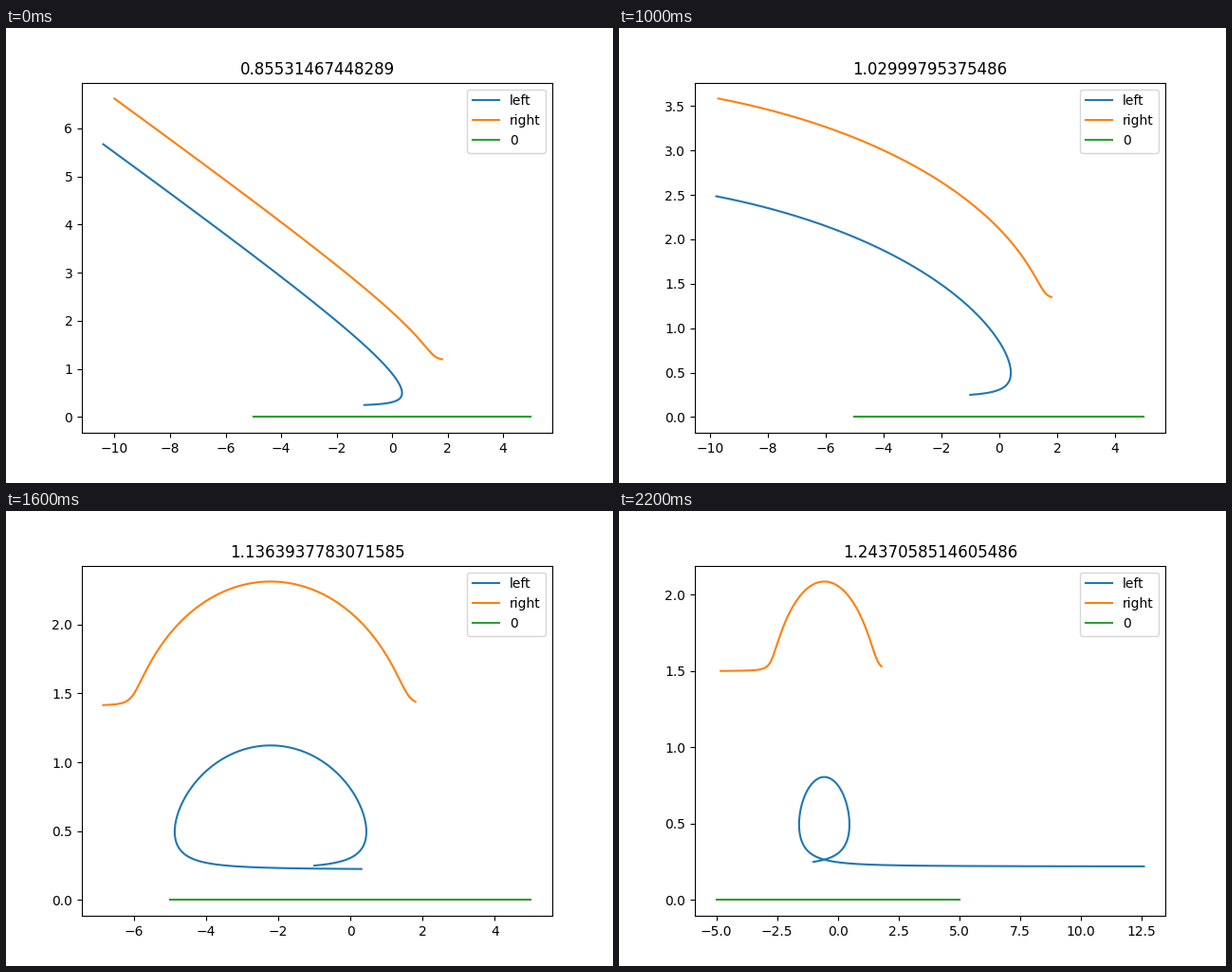
A matplotlib script for the animation above (2400 ms loop, 640x480 px).

```python
import numpy as np
import matplotlib.pyplot as plt
from matplotlib.animation import FuncAnimation

# Two opposite point vortices above a wall at y = 0, with mirror images.
X1, Y1, X2 = -1, 0.25, 1.8
HEIGHTS = np.arange(1.2, 1.55, 0.03)
T_END, STEPS = 15, 1500


def velocity(state):
    x1, y1, x2, y2 = state
    dx, d, s = x2 - x1, y2 - y1, y1 + y2
    r2, q2 = dx**2 + d**2, dx**2 + s**2
    v = dx * (1 / r2 - 1 / q2)
    u1 = 1 / (2 * y1) - d / r2 - s / q2
    u2 = -1 / (2 * y2) - d / r2 + s / q2
    return np.array([u1, v, u2, v])


def integrate(state):
    h = T_END / STEPS
    path = [state]
    for _ in range(STEPS):
        k1 = velocity(state)
        k2 = velocity(state + h / 2 * k1)
        k3 = velocity(state + h / 2 * k2)
        k4 = velocity(state + h * k3)
        state = state + h / 6 * (k1 + 2 * k2 + 2 * k3 + k4)
        path.append(state)
    return np.array(path)


def escape_ratio(y2):
    """Above 1 the pair separates, below 1 it flies off together."""
    d, dx = y2 - Y1, X2 - X1
    return d**2 * (1 / (4 * Y1 * y2) + 1 / (dx**2 + d**2))


ones = np.ones_like(HEIGHTS)
paths = integrate(np.array([X1 * ones, Y1 * ones, X2 * ones, HEIGHTS]))

fig, ax = plt.subplots(figsize=(6.4, 4.8), dpi=100)


def draw(i):
    ax.clear()
    x1, y1, x2, y2 = paths[:, :, i].T
    ax.plot(x1, y1, label="left")
    ax.plot(x2, y2, label="right")
    ax.plot([-5, 5], [0, 0], label="0")
    ax.set_title(str(escape_ratio(HEIGHTS[i])))
    ax.legend(loc="upper right")
    return ax.lines


anim = FuncAnimation(fig, draw, frames=len(HEIGHTS), init_func=lambda: [],
                     interval=200, repeat=True, repeat_delay=0)
plt.show()
```
